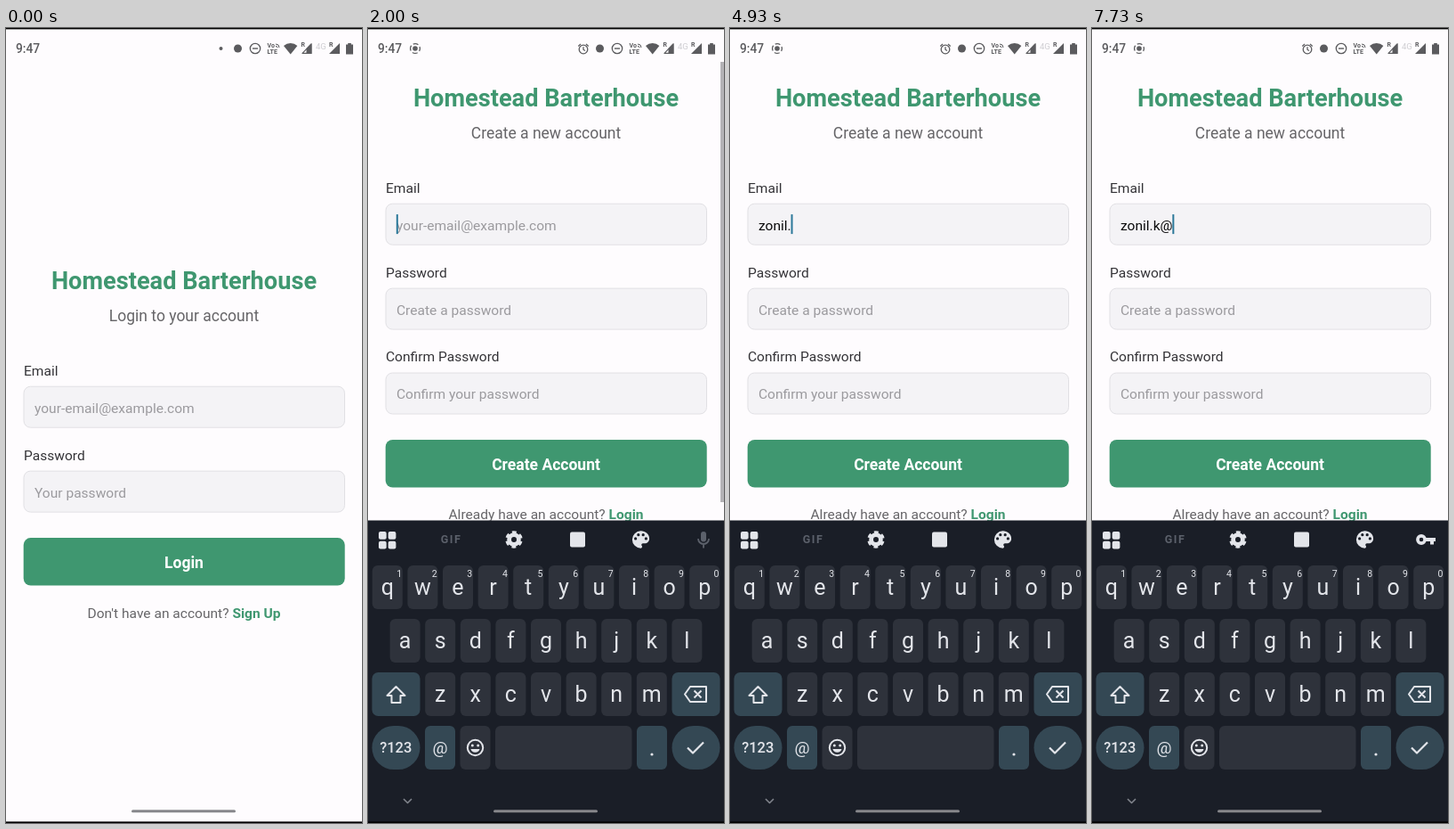
Recreate the animation shown at these times as an HTML page. Size 400 by 892 pixels, loop 8000 ms.

```html
<!DOCTYPE html>
<html lang="en">
<head>
<meta charset="utf-8">
<title>Sign up</title>
<style>
  html, body { margin: 0; height: 100%; overflow: hidden; background: #fefcfe; }
  svg { display: block; width: 100vw; height: 100vh; font-family: Roboto, sans-serif; }
</style>
</head>
<body>
<svg id="stage" viewBox="0 0 400 892"></svg>
<script>
const GREEN = '#3f9770', PAPER = '#fefcfe', STATUS = '#5b5b5e';
const KEYBOARD = '#1a1e27', KEY = '#2e323b', SPECIAL = '#344854', PRESSED = '#415876', LIGHT = '#e3e5ea';
const LOOP = 8000, BRAND = 'Homestead Barterhouse';

// Each press: character, finger down, finger up (the character appears on release).
const presses = [
  ['z', 2700, 2800], ['o', 2990, 3080], ['n', 3270, 3360], ['i', 3500, 3590], ['l', 3730, 3820],
  ['.', 4720, 4800], ['k', 5320, 5420], ['@', 6460, 6690]
];

// ---- SVG helpers ----
const escape = s => s.replace(/&/g, '&amp;').replace(/</g, '&lt;');
const rect = (x, y, w, h, r, fill, more = '') =>
  `<rect x="${x}" y="${y}" width="${w}" height="${h}" rx="${r}" fill="${fill}" ${more}/>`;
const circle = (x, y, r, fill, more = '') => `<circle cx="${x}" cy="${y}" r="${r}" fill="${fill}" ${more}/>`;
const text = (s, x, y, size, fill, more = '') =>
  `<text x="${x}" y="${y}" font-size="${size}" fill="${fill}" ${more}>${escape(s)}</text>`;
const centred = (s, x, y, size, fill, more = '') => text(s, x, y, size, fill, `text-anchor="middle" ${more}`);
const line = (d, stroke, width, more = '') =>
  `<path d="${d}" fill="none" stroke="${stroke}" stroke-width="${width}" stroke-linejoin="round" ${more}/>`;
const shape = (d, fill) => `<path d="${d}" fill="${fill}"/>`;
const group = (id, body, more = '') => `<g id="${id}" ${more}>${body}</g>`;
const at = (x, y, body) => `<g transform="translate(${x} ${y})">${body}</g>`;

// ---- App screens; the origin is the title's baseline ----
function form(subtitle, fields, button, question, link) {
  const end = fields.length * 94.9;
  return centred(BRAND, 200, 0, 27.2, GREEN, 'font-weight="700"') +
    centred(subtitle, 200, 36.5, 17.5, '#666568') +
    fields.map(([label, hint], i) => at(0, i * 94.9,
      text(label, 20, 97, 15.55, '#333236') +
      rect(20, 109.6, 360.5, 46, 7.5, '#f4f3f6', 'stroke="#e1e0e4"') +
      text(hint, 32, 139, 15.55, '#9b9a9e', i ? '' : 'class="hint"'))).join('') +
    rect(19.7, end + 89.7, 361, 53.5, 8, GREEN) +
    centred(button, 200, end + 123.8, 17.5, '#fff', 'font-weight="700"') +
    `<text x="200" y="${end + 179.2}" font-size="15.55" fill="#666568" text-anchor="middle">${question} ` +
    `<tspan class="link" fill="${GREEN}" font-weight="700">${link}</tspan></text>`;
}

const loginForm = form('Login to your account',
  [['Email', 'your-email@example.com'], ['Password', 'Your password']],
  'Login', "Don't have an account?", 'Sign Up');
const signupForm = form('Create a new account',
  [['Email', 'your-email@example.com'], ['Password', 'Create a password'],
   ['Confirm Password', 'Confirm your password']],
  'Create Account', 'Already have an account?', 'Login');

// ---- Status bar ----
const bold = 'font-weight="700"';
const signal = (x, filled) =>
  (filled ? shape(`M${x + 12} 17V29H${x}Z`, STATUS)
          : line(`M${x + 11.4} 18V28.4H${x + 1.5}Z`, STATUS, 1.1) + shape(`M${x + 12} 17V29H${x + 6}V23Z`, STATUS)) +
  text('R', x, 21, 7, STATUS, bold);
const statusBar = text('9:47', 11, 28.3, 13.8, STATUS, 'font-weight="500"') +
  group('idleIcons', circle(241.5, 23, 2, STATUS)) +
  group('liveIcons',
    circle(53, 23, 2.8, STATUS) +
    circle(53, 23, 5.4, 'none', `stroke="${STATUS}" stroke-width="1.3" stroke-dasharray="6 2.48" stroke-dashoffset="3"`) +
    circle(242, 24, 4.8, 'none', `stroke="${STATUS}" stroke-width="1.3"`) +
    line('M242 21.2V24.3L244 25.5M236.3 20.5L239 18M247.7 20.5L245 18', STATUS, 1.3)) +
  circle(260.5, 23, 4.5, STATUS) +
  circle(280, 23, 5.7, 'none', `stroke="${STATUS}" stroke-width="1.3"`) + line('M277 23H283', STATUS, 1.4) +
  text('Vo', 293.5, 22, 7, STATUS, bold) + line('M303 18a4 4 0 0 1 4 4M303 20.3a2 2 0 0 1 2 2', STATUS, 1) +
  text('LTE', 293.5, 29.3, 7, STATUS, bold) +
  shape('M319.7 29.5L312 20a11.5 11.5 0 0 1 15.4 0Z', STATUS) +
  signal(331.5, false) + text('4G', 348, 24, 9.5, '#cfced2') + signal(363, true) +
  shape('M382 18.5h2.2v-1.5h3.6v1.5h2.2v11h-8Z', STATUS);

// ---- Keyboard ----
const keyCentre = {};
const keyRows = (rows, hints) => rows.map((row, r) => [...row].map((c, i) => {
  const x = 200 + 39.6 * (i - (row.length - 1) / 2), y = 627.5 + 60 * r;
  keyCentre[c] = [x, y];
  return rect(x - 17, y - 24.5, 34, 49, 6, KEY) + centred(c, x, y + 8, 25, LIGHT) +
    (hints && !r ? centred(String((i + 1) % 10), x + 13.3, y - 12, 10.5, LIGHT) : '');
}).join('')).join('');
const modeKey = (id, label) =>
  rect(4.5, 783, 54, 49, 24.5, SPECIAL, `id="${id}"`) + centred(label, 31.3, 813, 16.5, LIGHT, 'font-weight="500"');

const letters = keyRows(['qwertyuiop', 'asdfghjkl', 'zxcvbnm'], true) +
  rect(4.5, 723, 54, 49, 7, SPECIAL) + at(31.5, 748, line('M0 -9L10 1H5V9H-5V1H-10Z', LIGHT, 2)) +
  modeKey('toSymbols', '?123') + centred('@', 81, 813.5, 19, LIGHT) +
  at(120.5, 807.5, circle(0, 0, 8.7, 'none', `stroke="${LIGHT}" stroke-width="2"`) +
    circle(-3.2, -2.6, 1.5, LIGHT) + circle(3.2, -2.6, 1.5, LIGHT) + shape('M-5 1.5H5A5.2 5.2 0 0 1 -5 1.5Z', LIGHT));
const symbols = keyRows(['1234567890', '@#₹_&-+()/', '*"\':;!?']) +
  rect(4.5, 723, 54, 49, 7, SPECIAL) + centred('=\\<', 31.5, 753, 15, LIGHT, 'font-weight="500"') +
  modeKey('toLetters', 'ABC') + centred(',', 81, 813, 22, LIGHT) +
  ['12', '34'].map((s, i) => centred(s, 121.5, 806 + 13 * i, 12.5, LIGHT, 'font-weight="500" letter-spacing="2.5"')).join('');
const sharedKeys =
  rect(64, 783, 34, 49, 6, SPECIAL) + rect(103.5, 783, 34, 49, 6, KEY) + rect(143, 783, 153.5, 49, 6, KEY) +
  rect(302, 783, 34, 49, 6, SPECIAL, 'id="dotKey"') + circle(319, 815, 1.6, LIGHT) +
  rect(341.5, 783, 54, 49, 24.5, SPECIAL) + at(368, 807.5, line('M-9 0L-3 6L9 -6', LIGHT, 2.2)) +
  rect(341.5, 723, 54, 49, 7, SPECIAL) +
  at(368, 747.5, line('M-6 -8.5H12V8.5H-6L-12 0Z M-1.5 -4L6.5 4M6.5 -4L-1.5 4', LIGHT, 2)) +
  line('M40 865L44.5 869.5L49 865', '#80848c', 1.6);

const gear = circle(0, 0, 5.4, 'none', `stroke="${LIGHT}" stroke-width="4.8"`) +
  circle(0, 0, 8.2, 'none', `stroke="${LIGHT}" stroke-width="3" stroke-dasharray="4.7 3.89" stroke-dashoffset="6.6"`);
const palette = `<g transform="scale(1.07) translate(-12 -12)">` +
  shape('M12 3a9 9 0 0 0 0 18c.8 0 1.5-.7 1.5-1.5 0-.8-.8-1.1-.8-2 0-.8.7-1.5 1.5-1.5H16c2.8 0 5-2.2 5-5C21 6.6 17 3 12 3Z', LIGHT) +
  [[6.5, 11], [9.5, 7], [14.5, 7], [17.5, 11]].map(([x, y]) => circle(x, y, 1.5, KEYBOARD)).join('') + '</g>';
const tools = [
  centred('GIF', 93.5, 578.3, 12.5, '#5c616b', 'font-weight="700" letter-spacing="1.5"'),
  at(164, 574, gear), rect(227, 565.5, 17, 17, 2, LIGHT), at(306.5, 574, palette)
].map((icon, i) => group('tool' + i, icon)).join('');
const mic = at(377, 574, rect(-3, -9, 6, 11.5, 3, '#5c616b') + line('M-6 -1a6 6 0 0 0 12 0M0 5V9.5', '#5c616b', 1.8));
const pass = at(375, 574, circle(-5, 0, 4.1, 'none', `stroke="${LIGHT}" stroke-width="3.6"`) +
  shape('M0 -2H11V2H9V5.5H5V2H0Z', LIGHT));

const chip = (id, address) => group(id, rect(-112.5, -17, 225, 34, 8, '#282c35') + rect(-107.5, -10, 20, 20, 5, '#000') +
  text(address, -81.5, 4.7, 13.5, LIGHT) + text('ex…', 74.5, 4.7, 13.5, '#b9bcc4'));
const keyboard = rect(0, 552.5, 400, 340, 0, KEYBOARD) +
  [[12, 565], [22.7, 565], [12, 575.7], [22.7, 575.7]].map(([x, y]) => rect(x, y, 8.7, 8.7, 2, LIGHT)).join('') +
  tools + group('mic', mic) + group('pass', pass) +
  group('chips', chip('chip0', 'zonil.tebhom@mail.test') + chip('chip1', 'zonill.tebhom@mail.test'), 'clip-path="url(#chipArea)"') +
  rect(350.5, 559, 1.2, 31, 0, '#8b8f97', 'id="divider"') +
  sharedKeys + group('letters', letters) + group('symbols', symbols) +
  group('popup', rect(-26.5, -28, 53, 56, 9, '#434956') + centred('', 0, 9, 30, LIGHT));

document.getElementById('stage').innerHTML =
  '<clipPath id="chipArea"><path d="M40 553H350.5V597H40Z"/></clipPath>' +
  rect(0, 0, 400, 892, 0, PAPER) +
  group('login', at(0, 292.6, loginForm)) +
  group('signup', rect(-80, -80, 560, 1052, 0, PAPER) + group('signupForm', signupForm +
    text('', 32, 139, 15.55, '#0b0b0c', 'id="typed"') + rect(0, 121.5, 2, 22, 0, '#2b7899', 'id="cursor"'))) +
  rect(396, 38, 4, 494, 0, '#b3b2b5', 'id="scrollbar"') +
  statusBar + group('keyboard', keyboard) +
  rect(141, 877.3, 117, 3, 1.5, '#87878b') +
  rect(0, 0, 400, 1.4, 0, '#000') + rect(0, 890.4, 400, 2, 0, '#000');

// ---- Motion ----
const $ = id => document.getElementById(id);
const set = (el, name, value) => el.setAttribute(name, value);
const show = (id, amount) => set($(id), 'opacity', Number(amount));
const ramp = (t, start, length) => Math.min(1, Math.max(0, (t - start) / length));
const within = (t, a, b) => t >= a && t < b;
const cubic = (s, a, b, c, d) => (1 - s) ** 3 * a + 3 * s * (1 - s) ** 2 * b + 3 * s * s * (1 - s) * c + s ** 3 * d;

// Two joined Bézier curves: a fast start and a very slow settle.
function fastOutExtraSlowIn(x) {
  const [xs, ys] = x < 1 / 6
    ? [[0, .05, .1333, .1667], [0, 0, .06, .4]]
    : [[.1667, .2083, .25, 1], [.4, .82, 1, 1]];
  let low = 0, high = 1;
  for (let i = 0; i < 20; i++) {
    const mid = (low + high) / 2;
    if (cubic(mid, ...xs) < x) low = mid; else high = mid;
  }
  return cubic(low, ...ys);
}
const zoom = (id, s) => set($(id), 'transform', `translate(200 446) scale(${s}) translate(-200 -446)`);
const link = $('login').querySelector('.link'), hint = $('signup').querySelector('.hint');
const popupLetter = $('popup').querySelector('text');

function draw(t) {
  show('idleIcons', t < 500);
  show('liveIcons', t >= 500);
  set(link, 'opacity', 1 - .7 * ramp(t, 690, 90) * (1 - ramp(t, 790, 170)));

  const open = fastOutExtraSlowIn(ramp(t, 977, 400));
  zoom('login', 1 + .15 * open);
  zoom('signup', .85 + .15 * open);
  show('login', t < 1300);
  show('signup', ramp(t, 1064.5, 83));

  set($('signupForm'), 'transform', `translate(0 ${t < 1790 ? 245 : 87.6})`);
  show('scrollbar', t >= 1790 ? 1 - ramp(t, 2270, 250) : 0);
  set($('keyboard'), 'transform', `translate(0 ${340 * (1 - ramp(t, 1715, 260)) ** 3})`);
  show('keyboard', t >= 1715);

  // Typing and the blinking cursor
  const done = presses.filter(p => p[2] <= t);
  $('typed').textContent = done.map(p => p[0]).join('');
  set(hint, 'opacity', done.length ? 0 : 1);
  set($('cursor'), 'x', 31.8 + (done.length ? $('typed').getComputedTextLength() : 0));
  const lastTouch = done.length ? done[done.length - 1][2] : 1730;
  show('cursor', t >= 1730 && (t - lastTouch) % 1000 < 500);

  // Keys under the finger; the full stop lights up, the others raise a bubble
  const [pressed] = presses.find(p => within(t, p[1], p[2])) || [''];
  const raised = pressed in keyCentre;
  show('popup', raised);
  if (raised) {
    const [x, y] = keyCentre[pressed];
    set($('popup'), 'transform', `translate(${Math.max(26.5, x)} ${y - 55})`);
    popupLetter.textContent = pressed;
  }
  const symbolMode = within(t, 5840, 6900);
  show('letters', !symbolMode);
  show('symbols', symbolMode);
  set($('dotKey'), 'fill', pressed === '.' ? PRESSED : SPECIAL);
  set($('toLetters'), 'fill', within(t, 5840, 5910) || t >= 6850 ? PRESSED : SPECIAL);
  set($('toSymbols'), 'fill', within(t, 6900, 6980) ? PRESSED : SPECIAL);

  // Toolbar icons give way to address chips, then return one by one
  for (let i = 0; i < 4; i++) show('tool' + i, t < 3000 ? 1 - ramp(t, 2200, 100) : ramp(t, 3950 + 60 * i, 150));
  [[166.5, 128], [400, 82]].forEach(([x, shrink], i) => {
    const s = ramp(t, 2300, 150) * (1 - ramp(t, 3800, shrink));
    set($('chip' + i), 'transform', `translate(${x} 575.5) scale(${.65 + .35 * s * s} ${s})`);
    show('chip' + i, s > 0);
  });
  show('divider', within(t, 2300, 3930));
  show('mic', t < 2300);
  show('pass', within(t, 2300, 4900) || t >= 6700);
}

function tick() {
  draw(performance.now() % LOOP);
  requestAnimationFrame(tick);
}
tick();
</script>
</body>
</html>
```
